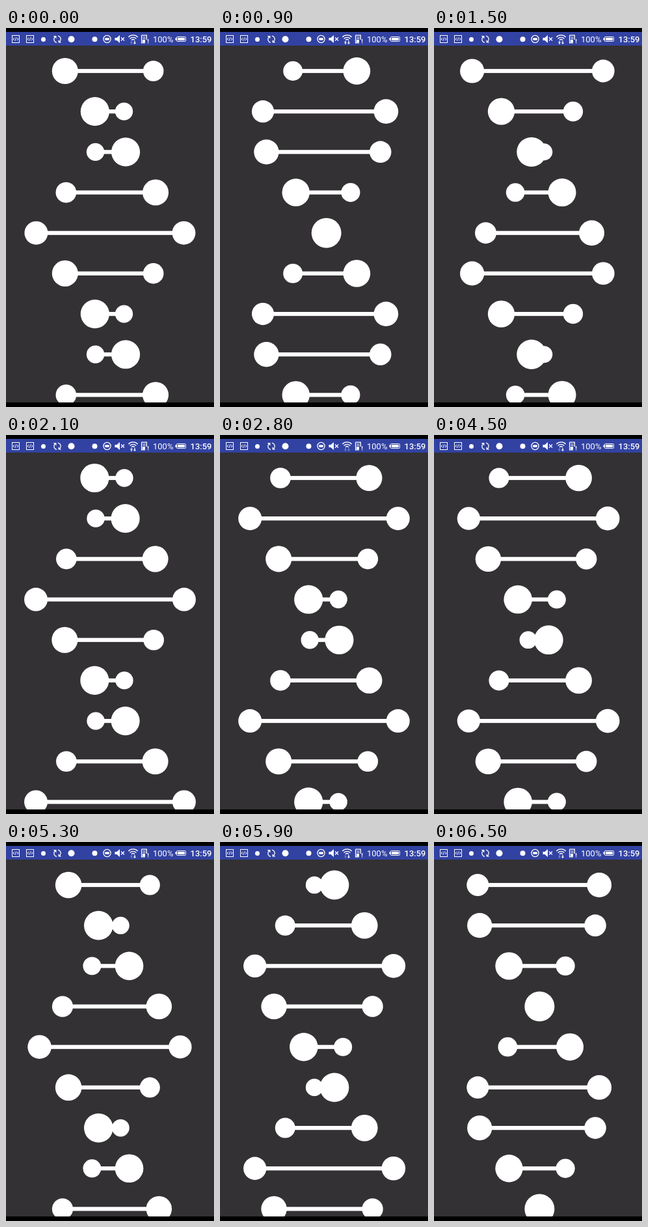
Write an HTML page that moves like this. It is 320 by 582 pixels and loops after 6.6 s.

```html
<!DOCTYPE html>
<html lang="en">
<head>
<meta charset="utf-8">
<title>Double helix loader</title>
<style>
  html, body { margin: 0; width: 100%; height: 100%; overflow: hidden; background: #000; }
  svg { display: block; width: 320px; height: 582px; }
  text { font: 13px Roboto, "Liberation Sans", sans-serif; fill: #fff; }
  .clock { font-weight: 500; }
  .line { fill: none; stroke: #fff; stroke-width: 1.3; }
  .thin { fill: none; stroke: #fff; stroke-width: 1; }
  .solid, #rows { fill: #fff; }
</style>
</head>
<body>
<svg viewBox="0 0 320 582">
  <defs>
    <g id="code">
      <rect class="thin" x="-5.5" y="-5.5" width="11" height="11"/>
      <path class="thin" d="M-2 -2L-4 0L-2 2M2 -2L4 0L2 2M.6 -2.5L-.6 2.5"/>
    </g>
  </defs>
  <rect y="6" width="320" height="21" fill="#3242a2"/>
  <rect y="27" width="320" height="548" fill="#333133"/>

  <g id="status">
    <use href="#code" x="15" y="17"/>
    <use href="#code" x="37" y="17"/>
    <circle class="solid" cx="57.5" cy="17.5" r="3.5"/>
    <!-- sync -->
    <path class="line" stroke-width="1.6" d="M78 22.3A5.2 5.2 0 0 1 75 13.8M80 12.2A5.2 5.2 0 0 1 83 20.7"/>
    <path class="solid" d="M72.8 12H77.4V16.4ZM85.2 22.6H80.6V18.2Z"/>
    <circle class="solid" cx="100.5" cy="17.3" r="5"/>
    <circle class="solid" cx="136.5" cy="17.3" r="4"/>
    <!-- do not disturb -->
    <circle class="line" cx="155.5" cy="17" r="5.6"/>
    <rect class="solid" x="152.2" y="15.2" width="6.6" height="3.6" rx=".8"/>
    <!-- muted speaker -->
    <path class="solid" d="M167.5 15H170.5L175 11V23L170.5 19H167.5Z"/>
    <path class="line" d="M177 14.5L182 19.5M182 14.5L177 19.5"/>
    <!-- wifi -->
    <path class="line" d="M188.3 14A10 10 0 0 1 202.7 14M190.6 16.5A6.8 6.8 0 0 1 200.4 16.5M193 18.7A3.6 3.6 0 0 1 198 18.7"/>
    <path class="solid" id="up" d="M193 20L195.2 22.2H193.7V25H192.3V22.2H190.8Z"/>
    <path class="solid" id="down" d="M198 25L195.8 22.8H197.3V20H198.7V22.8H200.2Z"/>
    <!-- card alert -->
    <path class="line" d="M208.6 11.2H216.3V18M214 22.9H208.6V11.2"/>
    <path class="thin" d="M210.5 14H214.5M210.5 16.3H214.5"/>
    <rect class="solid" x="210" y="18" width="4" height="4"/>
    <path class="line" d="M218.6 17V21.2M218.6 22.2V23.5"/>
    <text x="226" y="22">100%</text>
    <!-- battery -->
    <rect class="thin" x="262.5" y="13.5" width="14" height="7" rx="1"/>
    <rect class="solid" x="264" y="15" width="11" height="4"/>
    <rect class="solid" x="260.5" y="15.3" width="1.6" height="3.4"/>
    <text class="clock" x="283.5" y="22">13:59</text>
  </g>

  <g id="rows"></g>
  <rect y="575" width="320" height="7"/>
</svg>
<script>
  const LOOP = 6600, STEP = 100, HALF_TURN = 1753;
  const ROWS = 9, TOP = 66, GAP = 62.18, CENTER = 160;
  const REACH = 114, RADIUS = 18, BAR = 6.2;

  const group = document.getElementById("rows");
  const up = document.getElementById("up");
  const down = document.getElementById("down");

  function add(tag, attrs) {
    const el = document.createElementNS("http://www.w3.org/2000/svg", tag);
    set(el, attrs);
    group.appendChild(el);
    return el;
  }

  function set(el, attrs) {
    for (const key in attrs) el.setAttribute(key, attrs[key]);
  }

  const rows = Array.from({ length: ROWS }, (_, i) => {
    const y = TOP + i * GAP;
    return {
      bar: add("rect", { y: y - BAR / 2, height: BAR }),
      back: add("circle", { cy: y }),
      front: add("circle", { cy: y })
    };
  });

  // The front ball sweeps right while its partner passes behind it, five rows per half turn.
  function drawRow(row, i, t) {
    const phase = t / HALF_TURN + 0.002 + (i + 1) / 5;
    const u = phase - Math.floor(phase);
    const offset = REACH * (2 * u - 1);
    const depth = 1 - Math.abs(2 * u - 1);
    const front = CENTER + offset * (1 + 0.045 * depth);
    const back = CENTER - offset * (1 - 0.045 * depth);
    set(row.front, { cx: front, r: RADIUS + 5.1 * depth });
    set(row.back, { cx: back, r: RADIUS - 5.4 * depth });
    set(row.bar, { x: Math.min(front, back), width: Math.abs(front - back) });
  }

  function drawTraffic(t) {
    const idle = t >= 2400 && t < 4000;
    up.style.opacity = t >= 400 && t < 2400 ? 1 : 0.35;
    down.style.opacity = idle ? 0.35 : 1;
  }

  const start = performance.now();

  function draw(now) {
    const elapsed = Math.max(0, now - start) % LOOP;
    const t = Math.floor(elapsed / STEP) * STEP;
    rows.forEach((row, i) => drawRow(row, i, t));
    drawTraffic(t);
    requestAnimationFrame(draw);
  }

  draw(start);
</script>
</body>
</html>
```
